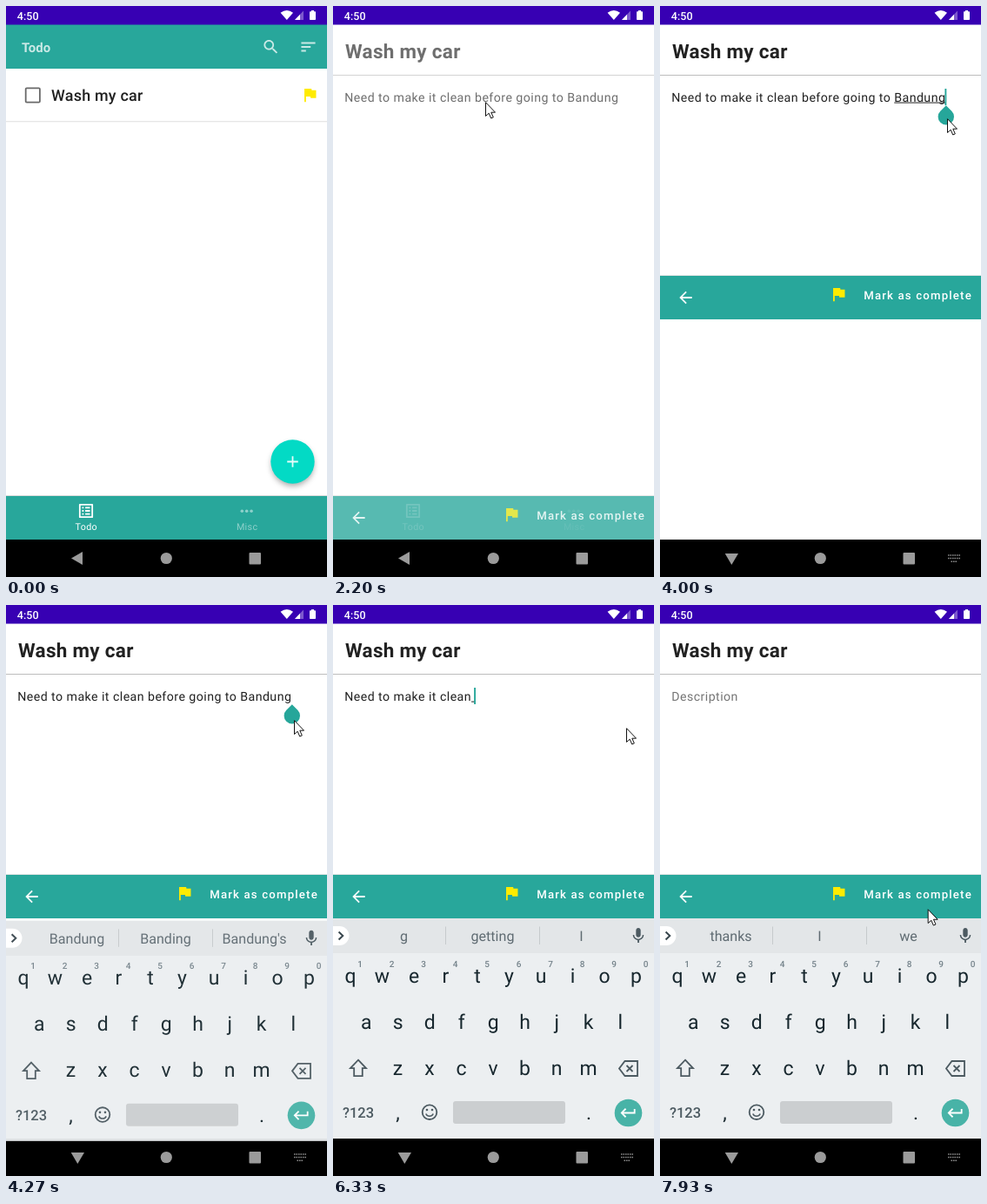
Recreate the animation shown at these times as an HTML page. Size 369x656 px, loop 8 s.

```html
<!DOCTYPE html>
<html lang="en">
<head>
<meta charset="utf-8">
<title>Todo app</title>
<style>
html, body { margin: 0; width: 100%; height: 100%; overflow: hidden; background: #fff; }
svg { display: block; width: 100vw; height: 100vh; }
text { font-family: Roboto, "Noto Sans", sans-serif; text-rendering: geometricPrecision; white-space: pre; }
.body { font-size: 14.2px; letter-spacing: .44px; }
.mid { text-anchor: middle; }
.medium { font-weight: 500; }
.key { font-size: 23px; fill: #17272e; text-anchor: middle; }
.num { font-size: 10px; font-weight: 500; fill: #74828a; text-anchor: middle; }
.word { font-size: 16.1px; fill: #5f6b72; text-anchor: middle; }
.tab { font-size: 10.76px; letter-spacing: .36px; text-anchor: middle; }
</style>
</head>
<body>
<svg viewBox="0 0 369 656" preserveAspectRatio="none">
  <defs>
    <filter id="soft" x="-50%" y="-50%" width="200%" height="200%"><feGaussianBlur stdDeviation="3"/></filter>
    <path id="flag" d="M14.4 6L14 4H5v17h2v-7h5.6l.4 2h7V6z" fill="#ffeb00"/>
    <path id="search" d="M15.5 14h-.79l-.28-.27C15.41 12.59 16 11.11 16 9.5 16 5.91 13.09 3 9.5 3S3 5.91 3 9.5 5.91 16 9.5 16c1.61 0 3.09-.59 4.23-1.57l.27.28v.79l5 4.99L20.49 19l-4.99-5zm-6 0C7.01 14 5 11.99 5 9.5S7.01 5 9.5 5 14 7.01 14 9.5 11.99 14 9.5 14z"/>
    <path id="sort" d="M3 18h6v-2H3zM3 6v2h18V6zM3 13h12v-2H3z"/>
    <path id="plus" d="M19 13h-6v6h-2v-6H5v-2h6V5h2v6h6z"/>
    <path id="listing" fill-rule="evenodd" d="M4 3H20a1 1 0 0 1 1 1V20a1 1 0 0 1-1 1H4a1 1 0 0 1-1-1V4a1 1 0 0 1 1-1zM5 5V19H19V5zM11 7h6v2h-6zM11 11h6v2h-6zM11 15h6v2h-6zM7 7h2v2H7zM7 11h2v2H7zM7 15h2v2H7z"/>
    <path id="back" d="M20 11H7.83l5.59-5.59L12 4l-8 8 8 8 1.41-1.41L7.83 13H20z"/>
    <path id="mic" d="M12 14c1.66 0 3-1.34 3-3V5c0-1.66-1.34-3-3-3S9 3.34 9 5v6c0 1.66 1.34 3 3 3zm5.3-3c0 3-2.54 5.1-5.3 5.1S6.7 14 6.7 11H5c0 3.41 2.72 6.23 6 6.72V21h2v-3.28c3.28-.48 6-3.3 6-6.72z"/>
    <path id="enter" d="M19 7v4H5.83l3.58-3.59L8 6l-6 6 6 6 1.41-1.41L5.83 13H21V7z"/>
    <g id="dots"><circle cx="6" cy="12" r="2"/><circle cx="12" cy="12" r="2"/><circle cx="18" cy="12" r="2"/></g>
  </defs>

  <rect width="369" height="656" fill="#fff"/>

  <g id="list">
    <rect y="21" width="369" height="51" fill="#28a79b"/>
    <text x="18" y="53" font-size="15" font-weight="700" fill="#fff" fill-opacity=".75">Todo</text>
    <g fill="#fff" fill-opacity=".75">
      <use href="#search" data-at="304.5,47"/>
      <use href="#sort" data-at="347.5,47"/>
    </g>
    <rect y="132" width="369" height="1" fill="#e6e6e6"/>
    <rect y="133" width="369" height="1" fill="#f6f6f6"/>
    <rect x="22.7" y="94.4" width="16.2" height="16.2" rx="1.2" fill="none" stroke="#6a6a6a" stroke-width="1.8"/>
    <text class="medium" x="52" y="109" font-size="17.94" letter-spacing=".22" fill="#212121">Wash my car</text>
    <use href="#flag" data-at="349.3,102.2"/>
    <circle cx="329.5" cy="527" r="24.5" fill="#000" fill-opacity=".32" filter="url(#soft)"/>
    <circle cx="329.5" cy="523.5" r="25.2" fill="#03dac5"/>
    <use href="#plus" data-at="329.5,523.5" fill="#fff" fill-opacity=".9"/>
  </g>

  <g id="tabs">
    <rect y="562" width="369" height="1" fill="#dcdcdc"/>
    <rect y="563" width="369" height="50" fill="#28a79b"/>
    <g fill="#fff">
      <use href="#listing" data-at="92,580"/>
      <text class="tab" x="92.3" y="602">Todo</text>
    </g>
    <g fill="#fff" fill-opacity=".48">
      <use href="#dots" data-at="276.7,580.3"/>
      <text class="tab" x="277.2" y="602">Misc</text>
    </g>
  </g>

  <g id="detail">
    <text x="14" y="60" font-size="22.5" font-weight="700" letter-spacing=".28" fill="#212121">Wash my car</text>
    <rect y="79" width="369" height="1" fill="#bdbdbd"/>
    <text id="note" class="body" x="13.2" y="110"></text>
    <rect id="under" y="110.6" height="1" fill="#212121"/>
    <rect id="caret" y="95" width="1.9" height="19" fill="#26a69a"/>
    <g id="bar">
      <rect y="562" width="369" height="1" fill="#e4e4e4"/>
      <rect y="563" width="369" height="50" fill="#28a79b"/>
      <use href="#back" data-at="29.5,588" fill="#fff"/>
      <use href="#flag" data-at="205.3,584.2"/>
      <text class="medium" x="234.2" y="589.7" font-size="13.2" letter-spacing="1.17" fill="#fff">Mark as complete</text>
    </g>
  </g>

  <rect y="613" width="369" height="43" fill="#000"/>

  <g id="keyboard">
    <rect y="360" width="369" height="253" fill="#eceff1"/>
    <rect y="360" width="369" height="40" fill="#e3e6e8"/>
    <path d="M129.5 369.500V390M237.500 369.500V390" stroke="#c6cacc"/>
    <path d="M0 369H7.500A11 11 0 0 1 7.500 391H0Z" fill="#fff"/>
    <path d="M6.600 375.500L11.300 380L6.600 384.500" fill="none" stroke="#39474e" stroke-width="2"/>
    <use href="#mic" data-at="351,380" fill="#4c5a61"/>
    <g id="words"></g>
    <g id="keys"></g>
    <g fill="none" stroke="#4c5a61" stroke-width="1.8">
      <path d="M29 522.700L38 532.200H33.800V541.200H24.200V532.200H20Z"/>
      <path d="M335.500 524H350V541H335.500L329 532.500Z"/>
      <path d="M337.500 529L344.500 536M344.500 529L337.500 536"/>
      <circle cx="111" cy="582.700" r="8.300"/>
      <path d="M106.800 584.500A4.600 4.600 0 0 0 115.200 584.500" stroke-width="1.600"/>
    </g>
    <g fill="#4c5a61">
      <circle cx="108" cy="580" r="1.300"/><circle cx="114" cy="580" r="1.300"/>
    </g>
    <text class="medium mid" x="29" y="589" font-size="16.5" fill="#4c5a61">?123</text>
    <text class="key" x="74.500" y="591">,</text>
    <text class="key" x="294" y="591">.</text>
    <rect x="138" y="570" width="129" height="26" rx="3" fill="#cbced0"/>
    <circle cx="339.500" cy="583.500" r="15.800" fill="#48b3a7"/>
    <use href="#enter" data-at="339.500,583.500" fill="#fff"/>
  </g>

  <g fill="#9b9b9b">
    <path id="navBack" d="M75 634.500L88 627V642Z"/>
    <path id="navDown" d="M74.700 629H90L82.300 642Z"/>
    <circle cx="184.300" cy="634.500" r="6.600"/>
    <rect x="279.500" y="628" width="13.500" height="13.500" rx="1"/>
    <path id="navKeys" d="M331 631H345M331 634.500H345M334.500 638.200H341.500" fill="none" stroke="#8a8a8a" stroke-width="1.600" stroke-dasharray="1.600 .880"/>
  </g>

  <rect width="369" height="21.500" fill="#3700b3"/>
  <text class="medium" x="12.800" y="15.800" font-size="12.560" fill="#fff">4:50</text>
  <g fill="#fff">
    <path d="M315.600 7.800Q322.800 2.400 330 7.800L322.800 16Z"/>
    <path d="M332 16H342V5.500Z" fill-opacity=".35"/>
    <path d="M332 16H338V9.700Z"/>
    <rect x="349" y="6.200" width="7" height="9.800" rx=".8"/>
    <rect x="351" y="5" width="3" height="2"/>
  </g>

  <path id="handle" d="M-9.200-9.200H0A9.200 9.200 0 1 1-9.200 0Z" transform="translate(328.800 127.300) rotate(45)" fill="#26a69a"/>
  <path id="pointer" d="M.500.700V16.500L4.200 13.200L6.700 19L9.300 17.900L6.800 12.200H11.500Z" fill="#fff" stroke="#111" stroke-width="1"/>
</svg>

<script>
const LOOP = 8000, STEP = 1000 / 15;
const NOTE = "Need to make it clean before going to Bandung";
const el = Object.fromEntries([...document.querySelectorAll("[id]")].map(n => [n.id, n]));

// pointer path: time, x, y
const PATH = [
  [1260, 341, 394], [1400, 262, 262], [1530, 180, 160], [1660, 157, 122], [1800, 175, 110],
  [2735, 175, 110], [2800, 196, 122], [3000, 290, 154], [3130, 318, 146], [3333, 330, 129],
  [4000, 330, 129], [4200, 331, 132], [4666, 331, 132], [4733, 339, 139], [4800, 337, 141],
  [7200, 337, 141], [7267, 335, 146], [7533, 322, 232], [7733, 311, 325], [7933, 306, 361]
];

const WORDS = [
  [0, "Bandung", "Banding", "Bandung's"],
  [5990, "g", "getting", "I"],
  [7060, "thanks", "I", "we"]
];

const clamp = v => Math.min(1, Math.max(0, v));
const ramp = (t, a, b) => clamp((t - a) / (b - a));
const show = (node, on) => node.setAttribute("visibility", on ? "visible" : "hidden");
const fade = (node, v) => node.setAttribute("opacity", v);
const shift = (node, x, y) => node.setAttribute("transform", `translate(${x} ${y})`);

function addText(parent, cls, x, y, str) {
  const n = document.createElementNS("http://www.w3.org/2000/svg", "text");
  n.setAttribute("class", cls);
  n.setAttribute("x", x);
  n.setAttribute("y", y);
  n.textContent = str;
  parent.append(n);
  return n;
}

// 24-unit icons, centred on data-at
for (const icon of document.querySelectorAll("[data-at]")) {
  const [x, y] = icon.dataset.at.split(",");
  icon.setAttribute("transform", `translate(${x} ${y}) scale(.897) translate(-12 -12)`);
}

[["qwertyuiop", 20], ["asdfghjkl", 38.2], ["zxcvbnm", 74.5]].forEach(([row, x0], r) =>
  [...row].forEach((c, i) => addText(el.keys, "key", x0 + 36.5 * i, 433.5 + 53 * r, c)));
[..."1234567890"].forEach((c, i) => addText(el.keys, "num", 31 + 36.5 * i, 415.5, c));
const slots = [81.5, 183.5, 285.5].map(x => addText(el.words, "word", x, 386, ""));

// caret offset after each character
const widths = [0];
for (let n = 1; n <= NOTE.length; n++) {
  el.note.textContent = NOTE.slice(0, n);
  widths.push(el.note.getComputedTextLength());
}

// one tap on delete, then a long press removing two letters per step
function noteLength(t) {
  if (t < 5130) return NOTE.length;
  if (t < 5595) return NOTE.length - 1;
  return Math.max(0, 42 - 2 * Math.floor((t - 5595) / STEP));
}

function pointerAt(t) {
  let i = PATH.findIndex(p => p[0] > t);
  if (i < 0) return PATH[PATH.length - 1].slice(1);
  const a = PATH[Math.max(0, i - 1)], b = PATH[i], k = ramp(t, a[0], b[0]);
  return [a[1] + (b[1] - a[1]) * k, a[2] + (b[2] - a[2]) * k];
}

function drawNote(t) {
  const n = noteLength(t), left = 13.2;
  el.note.textContent = n ? NOTE.slice(0, n) : "Description";
  el.note.setAttribute("fill", n ? "#212121" : "#757575");

  const caretOn = (t > 3595 && t < 4195) || (t > 4725 && t < 7490);
  show(el.caret, caretOn);
  el.caret.setAttribute("x", left + widths[n] - (n ? .9 : 0));

  let from = -1;
  if (t > 3925 && t < 4195) from = 38;
  else if (t > 5595 && n) from = Math.max(0, NOTE.slice(0, n).lastIndexOf(" "));
  show(el.under, from >= 0);
  if (from >= 0) {
    el.under.setAttribute("x", left + widths[from]);
    el.under.setAttribute("width", widths[n] - widths[from]);
  }
}

function draw(t) {
  fade(el.list, 1 - ramp(t, 2060, 2200));
  fade(el.tabs, 1 - ramp(t, 2060, 2280));
  fade(el.detail, ramp(t, 2060, 2275));
  drawNote(t);

  const typing = t > 3925;
  shift(el.bar, 0, typing ? -253 : 0);
  show(el.navBack, !typing);
  show(el.navDown, typing);
  show(el.navKeys, typing);
  show(el.handle, t > 3795 && t < 5130);

  const rest = (1 - ramp(t, 4176, 4376)) ** 5;
  shift(el.keyboard, 0, 58 * rest);
  fade(el.keyboard, 1 - rest);

  const words = WORDS.filter(w => w[0] <= t).pop();
  slots.forEach((s, i) => s.textContent = words[i + 1]);

  show(el.pointer, t > 1260);
  shift(el.pointer, ...pointerAt(t));
}

const start = performance.now();
function tick() {
  const t = (performance.now() - start) % LOOP;
  draw(Math.floor((t + .5) / STEP) * STEP);
  requestAnimationFrame(tick);
}
tick();
</script>
</body>
</html>
```
